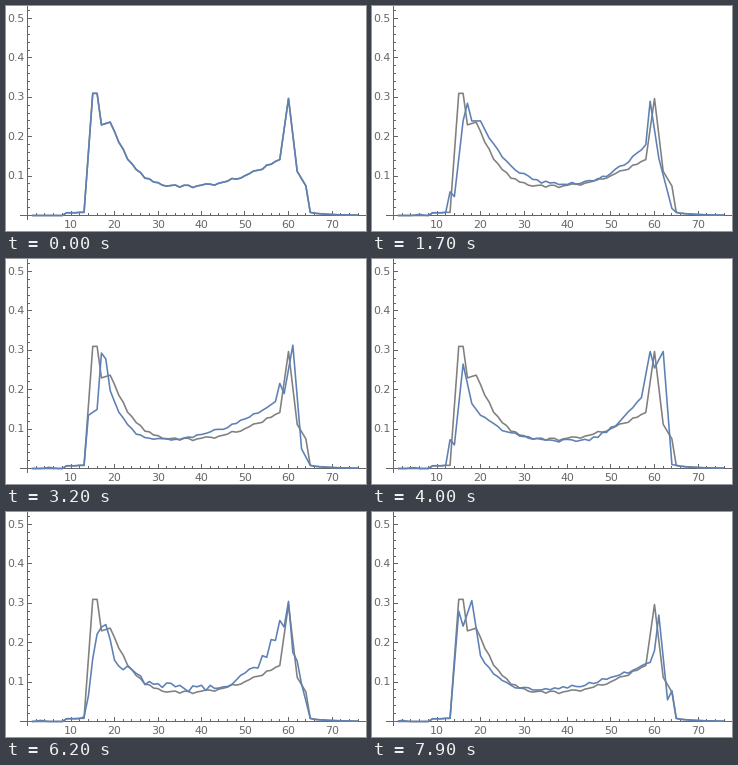
A matplotlib script that plays this animation: 360x225 px, repeating every 8000 ms.

```python
import numpy as np
import matplotlib.pyplot as plt
from matplotlib.animation import FuncAnimation

W, H, DPI = 360, 225, 72
FRAMES, STEP = 80, 100
X0, Y0, SX, SY = 21.5, 209.5, 4.35, 394
BLUE, GRAY, INK = "#5E81B5", "#808080", "#666666"

n = np.arange(1, 77)
rng = np.random.default_rng(4)

# Low tails outside the two peaks.
tail = np.where((n > 8) & (n < 14), .007, 0)
tail = tail + np.where(n > 64, .007 * np.exp(-(n - 65) / 5), 0)


def pose(left, dip, right):
    """Straight-sided peaks, joined by a valley that bottoms out at dip."""
    y = tail.copy()
    xs, ys = zip((12, 8), *left, *right, (65, 8))
    inner = (n >= 12) & (n <= 65)
    y[inner] = np.interp(n[inner], xs, ys) / 1000

    xm, ym = dip
    for (x, top), power in ((left[-1], 3), (right[0], 2)):
        u = (n - xm) / (x - xm)
        side = (u >= 0) & (u <= 1)
        y[side] = (ym + (top - ym) * u[side] ** power) / 1000

    valley = (n > left[-1][0]) & (n < right[0][0])
    y[valley] += rng.uniform(-.004, .004, valley.sum())
    return y


# Time of each pose, and its shape in (place, thousandths).
poses = {
    0: pose([(13, 8), (15, 310), (16, 310), (17, 230), (19, 237)], (36, 73),
            [(58, 142), (60, 297), (62, 112), (64, 75)]),
    17: pose([(13, 60), (14, 48), (16, 240), (17, 285), (18, 240), (20, 240)],
             (41, 80), [(58, 180), (59, 290), (61, 145), (64, 18)]),
    32: pose([(13, 8), (14, 135), (16, 150), (17, 293), (18, 278), (19, 198)],
             (31, 75), [(57, 170), (58, 216), (59, 190), (61, 313), (63, 50)]),
    40: pose([(13, 73), (14, 60), (16, 265), (18, 165), (20, 135)], (42, 70),
             [(57, 180), (59, 297), (60, 255), (62, 297), (64, 10)]),
    54: pose([(13, 14), (14, 100), (16, 155), (18, 283), (19, 170)], (37, 79),
             [(58, 260), (59, 235), (60, 285), (63, 80), (64, 100)]),
    69: pose([(13, 12), (14, 45), (16, 315), (18, 180), (19, 220), (21, 150)],
             (47, 82), [(57, 175), (60, 300), (61, 170), (63, 107), (64, 5)]),
    79: pose([(13, 8), (15, 280), (16, 242), (18, 307), (20, 167)], (33, 82),
             [(59, 150), (60, 180), (61, 270), (63, 55), (64, 78)]),
}
times = list(poses)
phase = rng.uniform(0, 2 * np.pi, 76)
period = rng.uniform(8, 14, 76)


def curve(f):
    """Blend neighbouring poses, with a flutter that fades out at each pose."""
    k = min(np.searchsorted(times, f, side="right"), len(times) - 1)
    a, b = times[k - 1], times[k]
    u = (f - a) / (b - a)
    y = (1 - u) * poses[a] + u * poses[b]
    flutter = np.sin(2 * np.pi * f / period + phase)
    # A faint bump creeps left along the tail.
    bump = .003 * np.clip(1 - abs(n - 7 + 5 * f / 79) / 1.5, 0, 1)
    return y * (1 + .09 * np.sin(np.pi * u) * flutter) + bump * min(f / 5, 1)


def px(x):
    return X0 + SX * np.asarray(x)


def py(y):
    return Y0 - SY * np.asarray(y)


def crisp(v):
    return np.floor(v) + .5


fig = plt.figure(figsize=(W / DPI, H / DPI), dpi=DPI, facecolor="white")
ax = fig.add_axes([0, 0, 1, 1])
ax.set(xlim=(0, W), ylim=(H, 0))
ax.axis("off")


def rule(xs, ys):
    ax.plot(xs, ys, color=INK, lw=1, zorder=1, solid_capstyle="butt",
            snap=False)


def label(x, y, text, ha):
    ax.text(x, y, text, ha=ha, va="center_baseline", color=INK,
            fontsize=11, family="DejaVu Sans")


rule([14, W], [Y0, Y0])
rule([X0, X0], [0, 214])
for v in range(2, 78, 2):
    major = v % 10 == 0
    x = crisp(px(v))
    rule([x, x], [Y0, Y0 - (4.5 if major else 2.5)])
    if major:
        label(px(v), 218.5, str(v), "center")
for i in range(1, 27):
    major = i % 5 == 0
    y = crisp(py(i / 50))
    rule([X0, X0 + (4.5 if major else 2.5)], [y, y])
    if major:
        label(18.5, py(i / 50) - 1, f"{i / 50:.1f}", "right")

style = dict(lw=1.6, solid_joinstyle="round", solid_capstyle="butt")
ax.plot(px(n), py(poses[0]), color=GRAY, zorder=2, **style)
line, = ax.plot(px(n), py(poses[0]), color=BLUE, zorder=3, **style)


def update(f):
    line.set_ydata(py(curve(f)))
    return line,


anim = FuncAnimation(fig, update, frames=FRAMES, interval=STEP,
                     repeat=True, repeat_delay=0, blit=False)
plt.show()
```
